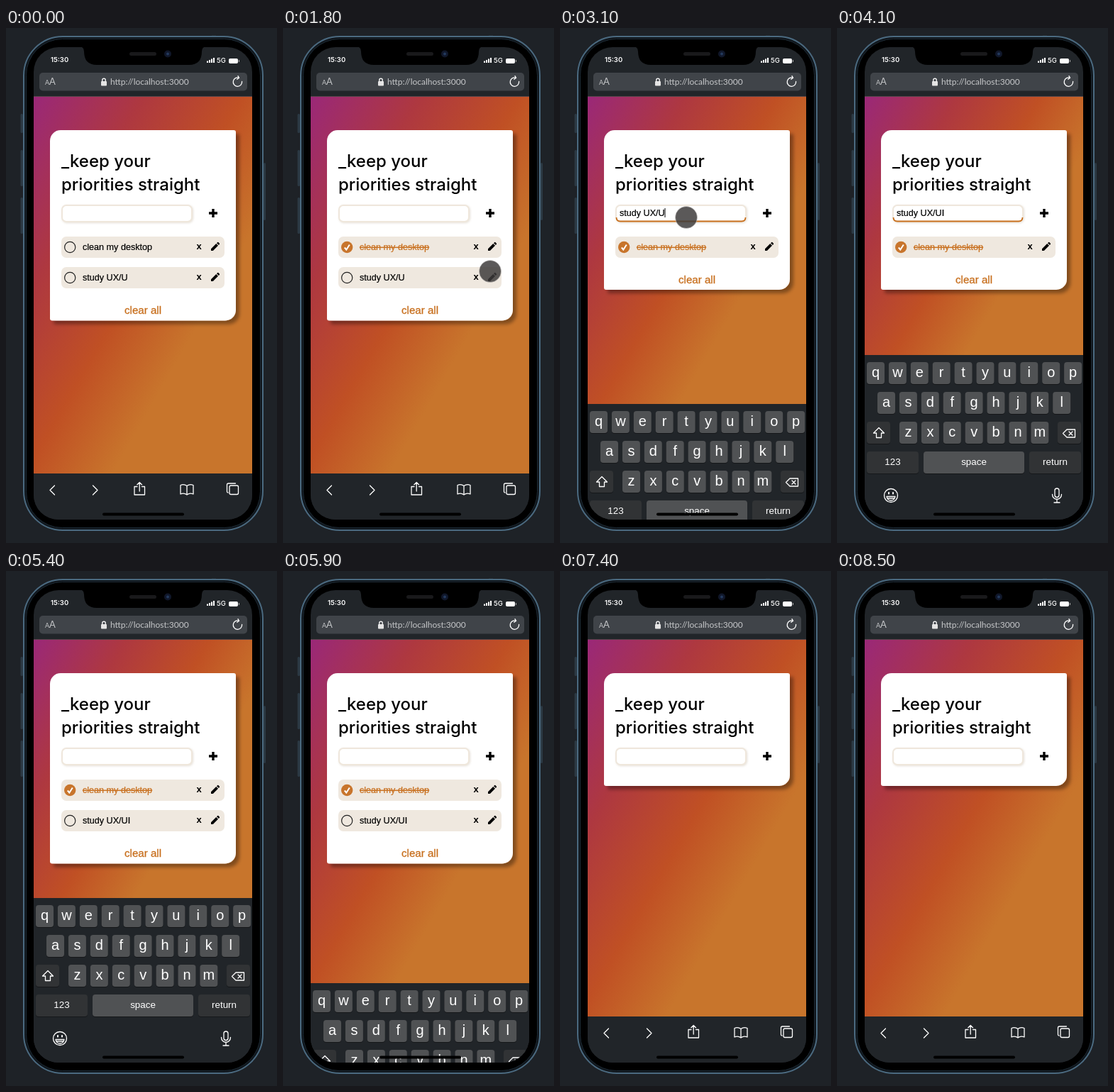
An HTML page that plays this animation: 382x726 px, repeating every 8600 ms.

```html
<!DOCTYPE html>
<html lang="en">
<head>
<meta charset="utf-8">
<title>Todo app on a phone</title>
<style>
html, body { margin: 0; width: 100%; height: 100%; overflow: hidden; background: #1e2227; }
svg { display: block; width: 382px; height: 726px; }
text { white-space: pre; }
.line { fill: none; stroke: #fff; stroke-width: 1.3; stroke-linecap: round; stroke-linejoin: round; }
.ui { font-family: "Liberation Sans", Arial, sans-serif; font-size: 12.6px; }
.ink { stroke: #000; stroke-width: .2; }
.title { font: 500 24px Inter, sans-serif; }
.status { font: 600 9.5px Inter, sans-serif; fill: #fff; }
.url { font: 12px Lato, sans-serif; fill: #c4c6c8; }
.clear { font-size: 15.1px; fill: #c8701f; stroke: #c8701f; stroke-width: .3; text-anchor: middle; }
.letter { font-size: 20px; fill: #fff; text-anchor: middle; }
.word { font-size: 13.4px; fill: #fff; text-anchor: middle; }
.cross { font-weight: bold; font-size: 13px; text-anchor: middle; }
</style>
</head>
<body>
<svg viewBox="0 0 382 726">
  <defs>
    <linearGradient id="sunset" gradientUnits="userSpaceOnUse">
      <stop offset="0" stop-color="#9a2878"/>
      <stop offset=".25" stop-color="#ae3840"/>
      <stop offset=".48" stop-color="#c05024"/>
      <stop offset=".68" stop-color="#c8752c"/>
    </linearGradient>
    <clipPath id="screen"><rect x="39" y="27" width="308" height="666" rx="35"/></clipPath>
    <filter id="cardShadow" x="-20%" y="-20%" width="140%" height="140%">
      <feDropShadow dx="5" dy="5" stdDeviation="2.5" flood-color="#000" flood-opacity=".36"/>
    </filter>
    <filter id="softShadow" x="-10%" y="-50%" width="120%" height="200%">
      <feDropShadow dx="1" dy="1" stdDeviation="1.5" flood-color="#b9a58f" flood-opacity=".35"/>
    </filter>
    <g id="row">
      <rect x="78" y="294" width="230" height="30" rx="7" fill="#efe8df"/>
      <text class="ui cross" x="272" y="312">x</text>
      <path d="M289 314v-2.8l7.2-7.2 2.8 2.8-7.2 7.2zM297 303.2l1-1q.8-.7 1.6 0l1.2 1.2q.7.8 0 1.6l-1 1z"/>
    </g>
  </defs>

  <!-- phone body -->
  <g fill="#2c3a45">
    <rect x="20.5" y="121" width="3.500" height="27" rx="1.500"/>
    <rect x="20.5" y="172" width="3.500" height="51" rx="1.500"/>
    <rect x="20.5" y="239" width="3.500" height="51" rx="1.500"/>
    <rect x="363" y="190" width="3" height="81" rx="1.500"/>
    <rect x="290" y="10.500" width="6" height="2"/>
  </g>
  <rect x="25" y="12" width="337" height="696" rx="55" fill="#10161c" stroke="#4b6a80" stroke-width="2"/>
  <rect x="28.500" y="15.500" width="330" height="689" rx="51" fill="#000" stroke="#1d2a34"/>

  <g clip-path="url(#screen)">
    <rect x="39" y="27" width="308" height="666" fill="#212529"/>
    <rect x="39" y="97" width="308" height="531" fill="url(#sunset)"/>
    <path d="M39 96.500h308" stroke="#6a5358" stroke-opacity=".7"/>

    <!-- browser bar -->
    <text class="status" x="63" y="48">15:30</text>
    <path d="M283 46.500h2v2.500h-2zM286 45h2v4h-2zM289 43.500h2v5.500h-2zM292 42h2v7h-2z" fill="#fff"/>
    <text class="status" x="297" y="49" style="font-weight:500">5G</text>
    <rect x="314" y="43" width="13" height="7" rx="2" fill="#fff"/>
    <path d="M328.500 45v3" stroke="#aaa"/>
    <rect x="47" y="63" width="293" height="25.500" rx="5" fill="#404449"/>
    <text class="url" x="55" y="80" style="font-size:9px">A<tspan font-size="13">A</tspan></text>
    <rect x="134" y="75" width="8" height="6.500" rx="1" fill="#e4e4e4"/>
    <path class="line" d="M135.800 75v-1.700a2.200 2.200 0 0 1 4.400 0v1.700"/>
    <text class="url" x="147" y="80">http://localhost:3000</text>
    <path class="line" d="M332.600 75.500a6.200 6.200 0 1 1-4-5.200l-1.600-2.700m1.600 2.700l-2.800 2"/>

    <!-- todo card -->
    <path id="card" fill="#fff" filter="url(#cardShadow)"/>
    <text class="title" x="78" y="196">_keep your</text>
    <text class="title" x="78" y="229">priorities straight</text>
    <rect x="79" y="250" width="183" height="23" rx="6" fill="#fff" stroke="#efe7dc" stroke-width="2" filter="url(#softShadow)"/>
    <path id="focus" d="M79.500 267q0 5.500 5.500 5.500h171q5.500 0 5.500-5.500" fill="none" stroke="#c8701f" stroke-width="1.800"/>
    <text id="typed" class="ui ink" x="84" y="265"></text>
    <path id="caret" d="M0 254v13" stroke="#000"/>
    <path d="M286 261h12M292 255v12" stroke="#000" stroke-width="3.400"/>

    <g id="first">
      <use href="#row"/>
      <circle id="ring" cx="90.200" cy="309" r="7.600" fill="none" stroke="#222" stroke-width="1.200"/>
      <g id="tick">
        <circle cx="90.200" cy="309" r="8.200" fill="#c8752c"/>
        <path d="M86.800 309.500l2.500 3 4.500-7" fill="none" stroke="#fff" stroke-width="2"/>
      </g>
      <text id="task" class="ui" x="108" y="313" stroke-width=".2">clean my desktop</text>
    </g>
    <g id="second" transform="translate(0 43)">
      <use href="#row"/>
      <circle cx="90.200" cy="309" r="7.600" fill="none" stroke="#222" stroke-width="1.200"/>
      <text id="study" class="ui ink" x="108" y="313"></text>
    </g>
    <text id="clear" class="ui clear" x="193">clear all</text>

    <!-- toolbar -->
    <rect x="39" y="628" width="308" height="65" fill="#212529"/>
    <g class="line">
      <path d="M68.500 645l-6.500 6.500 6.500 6.500M122.500 645l6.500 6.500-6.500 6.500"/>
      <path d="M185 646.500h-4v11.500h14.500v-11.500h-4M188.200 653v-12.500m-3.300 3.300l3.300-3.300 3.300 3.300"/>
      <path d="M255 658q-4-3-9-1v-12.500q5-2 9 1 4-3 9-1v12.500q-5-2-9 1zv-12.500"/>
      <rect x="315" y="645" width="12.500" height="12.500" rx="2"/>
      <path d="M323.500 642h-10q-2 0-2 2v9.500q0 1.500 1.500 1.500"/>
    </g>

    <g id="keyboard">
      <rect x="39" y="461" width="308" height="240" fill="#212529"/>
      <g id="keys"></g>
      <g class="line">
        <path d="M59 563.500l-7.500 7.500h4v6.500h7v-6.500h4z"/>
        <path d="M324 566h11.500v11h-11.500l-5.500-5.500zM327 569l5 5m0-5l-5 5"/>
        <circle cx="76" cy="659" r="9.500"/>
        <path d="M70 660.500h12q-1 5.500-6 5.500t-6-5.500zM71 663h10"/>
        <path d="M73 655v1.500M79 655v1.500" stroke-width="2"/>
        <rect x="307" y="649" width="6" height="12.500" rx="3"/>
        <path d="M303.500 657.500c0 9 13 9 13 0M310 664.500v4.500m-4 0h8"/>
      </g>
    </g>
    <rect x="136" y="683.500" width="115" height="4" rx="2" fill="#000"/>
    <circle id="pointer" r="15.500" fill="#3b3939" fill-opacity=".84" stroke="#dcd8d5" stroke-opacity=".5"/>
  </g>

  <!-- notch -->
  <path d="M104 26q6 1 6 7 0 19 18 19h130q18 0 18-19 0-6 6-7z" fill="#000"/>
  <rect x="174" y="34" width="38" height="5" rx="2.500" fill="#19191b"/>
  <circle cx="228" cy="36.500" r="5" fill="#10172a"/>
  <circle cx="228" cy="36.500" r="2" fill="#23395c"/>
</svg>
<script>
const LOOP = 8600, STEP = 100;
const $ = id => document.getElementById(id);
const show = (id, on) => $(id).style.display = on ? "" : "none";
const set = (id, attrs) => {
  for (const name in attrs) $(id).setAttribute(name, attrs[name]);
};

const dark = "#313335", light = "#505254";
const key = (x, y, w, label = "", fill = light, type = "letter") =>
  `<rect x="${x}" y="${y + 1}" width="${w}" height="31" rx="4" fill="#151719"/>
   <rect x="${x}" y="${y}" width="${w}" height="31" rx="4" fill="${fill}"/>
   <text class="ui ${type}" x="${x + w / 2}" y="${y + (type === "word" ? 19 : 21)}">${label}</text>`;
const keyRow = (letters, x, y) => [...letters].map((c, i) => key(x + i * 30.9, y, 25, c)).join("");
$("keys").innerHTML =
  keyRow("qwertyuiop", 42, 471) + keyRow("asdfghjkl", 57, 513) + keyRow("zxcvbnm", 88, 555) +
  key(42, 555, 33, "", dark) + key(311, 555, 33, "", dark) +
  key(42, 597, 73, "123", dark, "word") + key(122, 597, 142, "space", light, "word") +
  key(271, 597, 73, "return", dark, "word");

// time, x, y, opacity
const pointerPath = [
  [400, 150, 370, 0], [500, 142, 362, 1], [900, 91, 312, 1], [1200, 91, 310, 1],
  [1800, 292, 343, 1], [2000, 294, 351, 1], [2200, 294, 351, 1], [2800, 178, 267, 1],
  [3100, 178, 267, 1], [3400, 178, 267, 0], [4100, 250, 330, 0], [4200, 254, 322, 1],
  [4600, 292, 262, 1], [4900, 292, 262, 1], [5200, 292, 262, 0], [6400, 212, 345, 0],
  [6500, 206, 360, 1], [6700, 195, 387, 1], [6900, 193, 397, 1], [7100, 193, 397, 1],
  [7400, 193, 397, 0]
];

// time, offset from the raised position
const keyboardPath = [
  [2900, 240], [3000, 160], [3100, 69], [3200, 26], [3300, 8], [3400, 0],
  [5700, 0], [5800, 45], [5900, 120], [6000, 185], [6100, 240]
];

const smooth = p => p * p * (3 - 2 * p);

function sample(path, t) {
  const i = path.findIndex(p => p[0] > t);
  if (i === 0) return path[0].slice(1);
  if (i < 0) return path[path.length - 1].slice(1);
  const a = path[i - 1], b = path[i];
  const p = smooth((t - a[0]) / (b[0] - a[0]));
  return a.slice(1).map((v, k) => v + (b[k + 1] - v) * p);
}

function cardPath(bottom) {
  return `M77 144H321a3 3 0 0 1 3 3V${bottom - 15}a15 15 0 0 1-15 15H65a3 3 0 0 1-3-3V159a15 15 0 0 1 15-15z`;
}

// The 120deg gradient spans the part of the page above the keyboard.
function fitGradient(height) {
  const dx = Math.sin(Math.PI / 3), dy = 0.5;
  const half = (308 * dx + height * dy) / 2;
  const cx = 193, cy = 97 + height / 2;
  set("sunset", {
    x1: cx - half * dx, y1: cy - half * dy,
    x2: cx + half * dx, y2: cy + half * dy
  });
}

function render(t) {
  const checked = t >= 1100, editing = t >= 2100 && t < 4800;
  const cleared = t >= 7100, focused = t >= 3000 && t < 4800;
  const count = cleared ? 0 : editing ? 1 : 2;
  const complete = t >= 3700;
  const taskColor = checked ? "#c8701f" : "#000";

  set("card", { d: cardPath([303, 369, 412.5][count]) });
  show("first", count > 0);
  show("second", count > 1);
  show("clear", count > 0);
  set("clear", { y: count > 1 ? 403 : 360 });
  show("tick", checked);
  show("ring", !checked);
  set("task", {
    fill: taskColor, stroke: taskColor,
    "text-decoration": checked ? "line-through" : "none"
  });

  const label = complete ? "study UX/UI" : "study UX/U";
  $("study").textContent = label;
  $("typed").textContent = editing ? label : "";
  show("focus", focused);
  show("caret", focused && !(t >= 3900 && t < 4400));
  set("caret", { transform: `translate(${complete ? 152 : 148} 0)` });

  const [drop] = sample(keyboardPath, t);
  show("keyboard", drop < 240);
  set("keyboard", { transform: `translate(0 ${drop})` });
  fitGradient(Math.min(531, 364 + drop));

  const [x, y, alpha] = sample(pointerPath, t);
  set("pointer", { transform: `translate(${x} ${y})`, opacity: alpha });
}

function tick() {
  const t = performance.now() % LOOP;
  render(Math.floor(t / STEP) * STEP);
  requestAnimationFrame(tick);
}
tick();
</script>
</body>
</html>
```
